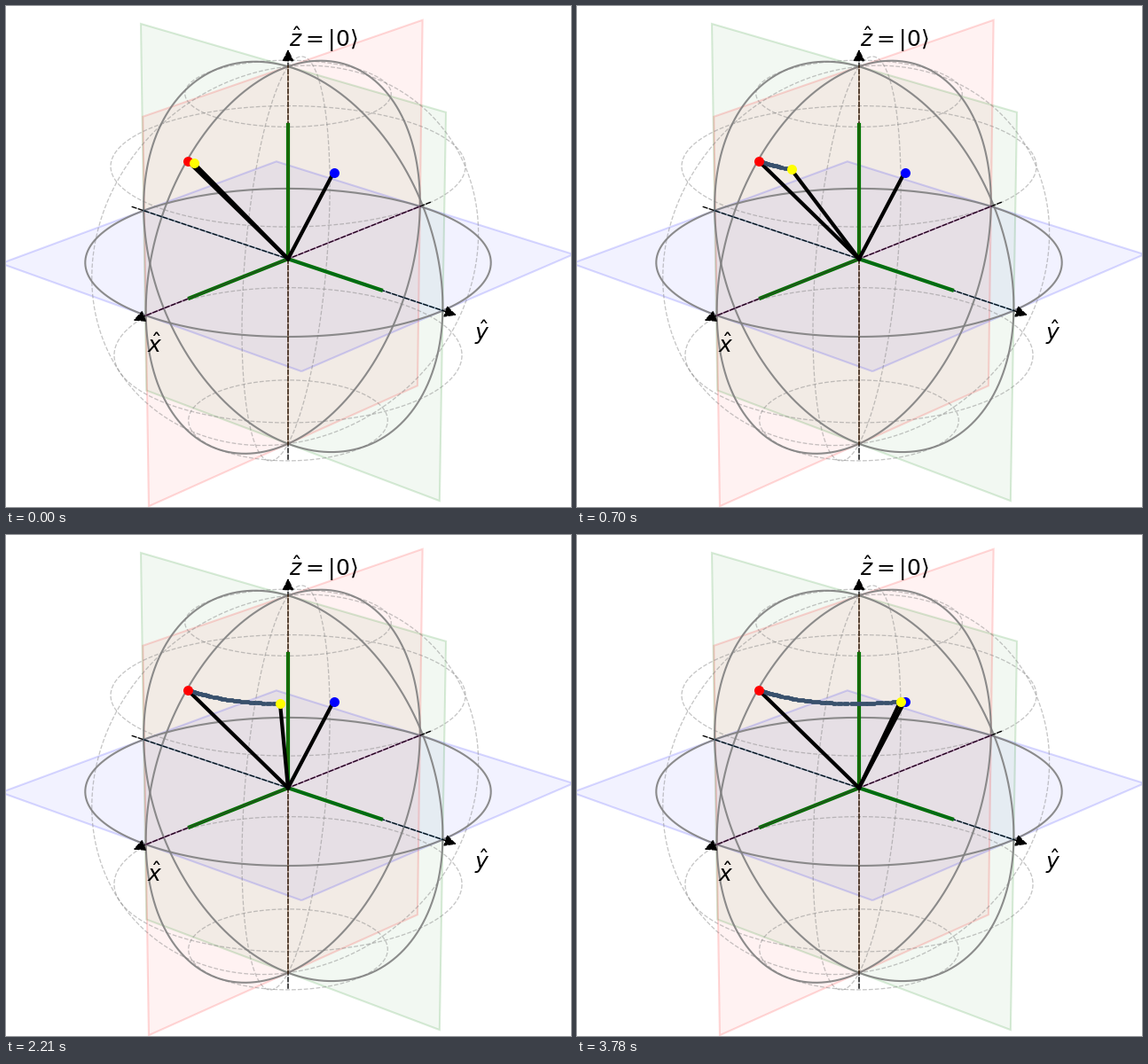
A matplotlib script for the animation above (3.87 s loop, 637x565 px).

```python
import numpy as np
import matplotlib.pyplot as plt
from matplotlib.animation import FuncAnimation
from matplotlib.patches import FancyArrowPatch, Polygon

W, H, DPI = 637, 565, 128
PX = 72 / DPI                      # points per pixel
INTERVAL, LOOP = 30, 3870

AZ, EL = np.radians(42.5), np.radians(21.4)
RADIUS, DEPTH = 228.4, 0.0545
CENTRE = (318, 285.2)


def project(x, y, z):
    """Perspective view of a point of the unit sphere, in pixels."""
    side = -np.sin(AZ) * x + np.cos(AZ) * y
    out = np.cos(AZ) * x + np.sin(AZ) * y
    near = np.cos(EL) * out + np.sin(EL) * z
    up = np.cos(EL) * z - np.sin(EL) * out
    scale = RADIUS / (1 - DEPTH * near)
    return CENTRE[0] + side * scale, CENTRE[1] - up * scale


fig = plt.figure(figsize=(W / DPI, H / DPI), dpi=DPI, facecolor="white")
ax = fig.add_axes([0, 0, 1, 1])
ax.set_xlim(0, W)
ax.set_ylim(H, 0)
ax.axis("off")


def line(points, color, width, **kw):
    return ax.plot(*points, color=color, lw=width * PX, **kw)[0]


def plane(a, b, color):
    """Translucent square spanned by two axes, with edges and mid-lines."""
    a, b = np.array(a), np.array(b)
    corners = [project(*(i * a + j * b)) for i, j in ((1, 1), (1, -1), (-1, -1), (-1, 1))]
    ax.add_patch(Polygon(corners, fc=color, alpha=0.05, lw=0, zorder=1))
    ax.add_patch(Polygon(corners, fill=False, ec=color, alpha=0.15, lw=2.1 * PX, zorder=2))
    for d in (a, b):
        ends = np.array([project(*-d), project(*d)]).T
        line(ends, color, 2, alpha=0.13, zorder=7)


def sphere():
    t = np.linspace(0, 2 * np.pi, 181)
    c, s, o = np.cos(t), np.sin(t), 0 * t
    wire = dict(color="gray", width=1.3, alpha=0.45, ls="--", zorder=3)
    for lat in np.radians([-60, -30, 30, 60]):
        r = np.cos(lat)
        line(project(r * c, r * s, o + np.sin(lat)), **wire)
    for lon in np.radians([30, 150]):
        line(project(s * np.cos(lon), s * np.sin(lon), c), **wire)
    for ring in ((c, s, o), (c, o, s), (o, c, s)):
        line(project(*ring), "gray", 2.1, alpha=0.9, zorder=4)


def axes3d():
    for d, stick in zip(np.eye(3), (0.7, 0.61, 0.7)):
        ax.add_patch(FancyArrowPatch(
            project(*(-1.1 * d)), project(*(1.1 * d)), arrowstyle="-|>",
            mutation_scale=27.8 * PX, shrinkA=2.8 * PX, shrinkB=2.8 * PX,
            lw=1.39 * PX, ls="--", color="black", zorder=5))
        ends = np.array([CENTRE, project(*(stick * d))]).T
        line(ends, "#007400", 4.2, zorder=6)
    for x, y, label in ((159, 391, r"$\hat{x}$"), (528, 377, r"$\hat{y}$"),
                        (319, 46, r"$\hat{z}=|0\rangle$")):
        ax.text(x, y, label, fontsize=25 * PX, va="baseline", ha="left", zorder=12)


X, Y, Z = np.eye(3)
plane(X, Y, "blue")
plane(Y, Z, "green")
plane(X, Z, "red")
sphere()
axes3d()

RED, BLUE = (204.5, 174.5), (369.5, 187.5)

# Path of the moving point
key_t = [0, 500, 940, 1400, 2210, 3110, 3780]
key_x = [211.5, 229.5, 255.5, 277.5, 309, 339.5, 364.5]
key_y = [177, 182, 186, 189, 190, 189.5, 187.5]
curve = np.polyfit([RED[0]] + key_x + [BLUE[0]], [RED[1]] + key_y + [BLUE[1]], 3)

# Moments at which the point moves: (first, last, count)
bursts = [(30, 530, 16), (570, 1070, 16), (1100, 1600, 13), (1640, 2110, 9),
          (2210, 2710, 10), (2740, 3240, 9), (3310, 3780, 9)]
moves = np.concatenate([[0]] + [np.linspace(*b) for b in bursts])
lead = np.linspace(RED[0], key_x[0], 6)[:-1]
path_x = np.concatenate([lead, np.interp(moves, key_t, key_x)])
path_y = np.polyval(curve, path_x)


def spoke(tip):
    return line(np.array([CENTRE, tip]).T, "black", 4.2, zorder=8)


def dot(pos, color, z):
    return ax.plot(*[[p] for p in pos], "o", ms=11 * PX, mew=0, color=color, zorder=z)[0]


spoke(RED)
spoke(BLUE)
dot(RED, "red", 10)
dot(BLUE, "blue", 10)
arm = spoke(RED)
tip = dot(RED, "yellow", 11)
trail = ax.plot([], [], "o", ms=4.8 * PX, mew=0, color="#38506c", zorder=9)[0]


def update(k):
    now = k * INTERVAL + 20
    n = len(lead) + np.searchsorted(moves, now, side="right")
    x, y = path_x[n - 1], path_y[n - 1]
    trail.set_data(path_x[:n], path_y[:n])
    arm.set_data([CENTRE[0], x], [CENTRE[1], y])
    tip.set_data([x], [y])
    return trail, arm, tip


anim = FuncAnimation(fig, update, frames=LOOP // INTERVAL, interval=INTERVAL,
                     init_func=lambda: update(0), repeat=True, repeat_delay=0)
plt.show()
```
